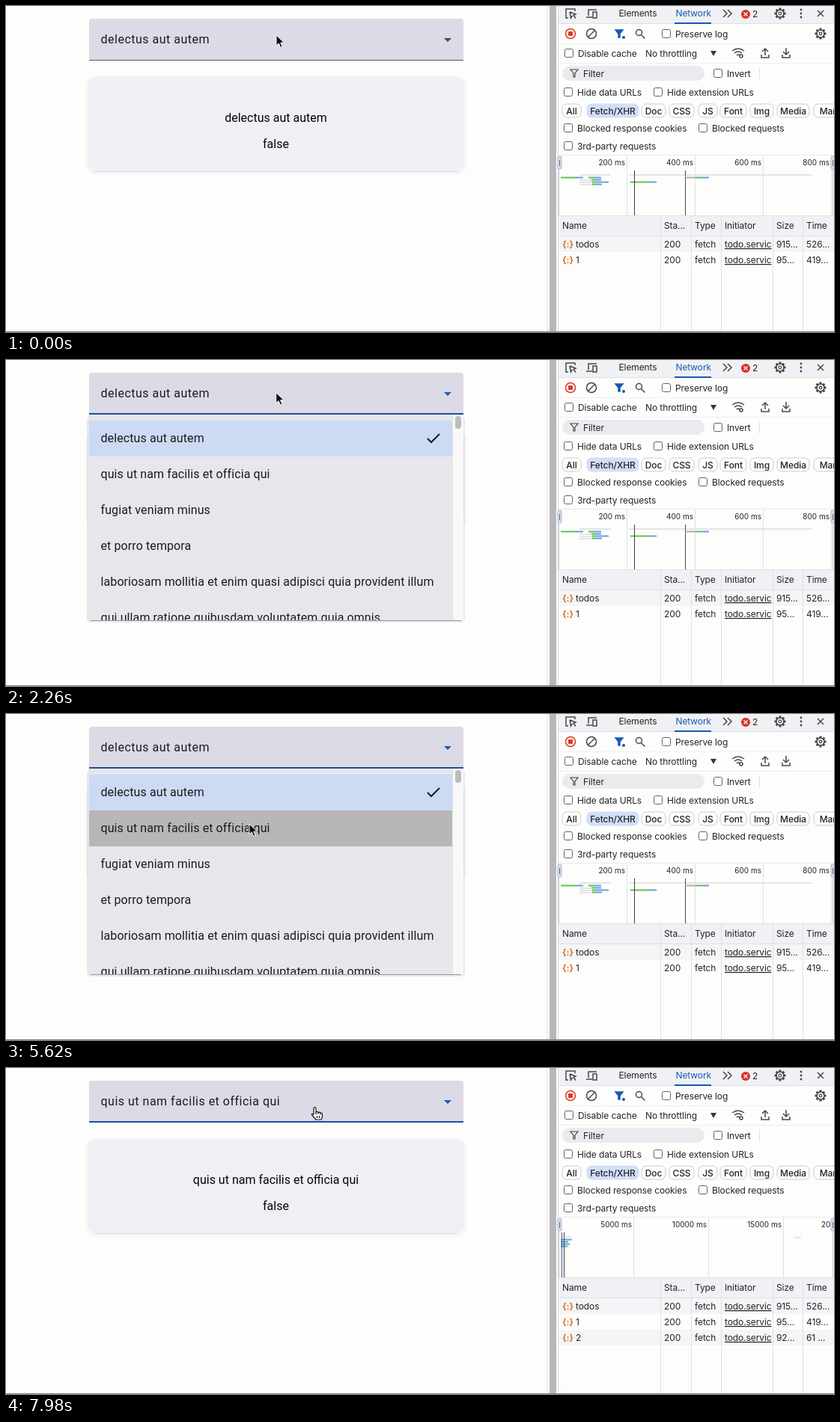
Animation, 1106 px wide and 436 px high, one loop 8 s. Source, as an HTML page:

```html
<!DOCTYPE html>
<html lang="en">
<head>
<meta charset="utf-8">
<title>Select with network panel</title>
<style>
html, body { margin: 0; width: 100%; height: 100%; overflow: hidden; background: #fdfdfb; }
svg { display: block; }
text { white-space: pre; }
.app { font: 16px Roboto, sans-serif; fill: #1b1b1f; }
.tools { font: 12px Inter, sans-serif; letter-spacing: -.1px; fill: #232326; }
.small { font-size: 10px; letter-spacing: 0; }
.icon { fill: none; stroke: #47474b; stroke-width: 1.5; }
</style>
</head>
<body>
<svg id="stage" width="1106" height="436" viewBox="0 0 1106 436"></svg>
<script>
const LOOP = 8000, FOCUS = 1700, OPEN = 1880, PRESS = 5450, CLOSE = 5720, LOADED = 5860;
const PAGE = '#fdfdfb', BAR = '#f0f1f4', RULE = '#dfe0e5', BLUE = '#1559b7';
const FIRST = 'delectus aut autem', SECOND = 'quis ut nam facilis et officia qui';
const OPTIONS = [FIRST, SECOND, 'fugiat veniam minus', 'et porro tempora',
  'laboriosam mollitia et enim quasi adipisci quia provident illum',
  'qui ullam ratione quibusdam voluptatem quia omnis'];
// time, x, y of the pointer tip
const PATH = [[0, 361, 39], [900, 361, 39], [1500, 361, 43], [2200, 361, 43], [3060, 341, 86],
  [4100, 322, 140], [4900, 322, 140], [PRESS, 325, 147], [5900, 325, 147],
  [7120, 370, 122], [7480, 374, 64], [7980, 412, 53], [LOOP, 412, 53]];

const rect = (x, y, w, h, fill, more = '') =>
  `<rect x="${x}" y="${y}" width="${w}" height="${h}" fill="${fill}" ${more}/>`;
const text = (x, y, s, more = '') => `<text x="${x}" y="${y}" ${more}>${s}</text>`;
const path = (d, more = '') => `<path d="${d}" ${more}/>`;
const vline = (x, y, h, fill = RULE) => rect(x, y, 1, h, fill);
const icon = (d, more = '') => path(d, `class="icon" ${more}`);
const check = (x, y, label) =>
  rect(x - 5.5, y - 5.5, 11, 11, '#fefefe', 'rx="2" stroke="#626266"') +
  text(x + 12, y + 4.5, label);
const funnel = (x, y, more = '') =>
  icon(`M${x - 5} ${y - 5}h10l-4 5v5h-2v-5z`, more);

function gear(x, y) {
  let teeth = '';
  for (let a = 0; a < 360; a += 45)
    teeth += rect(x - 1.5, y - 7.5, 3, 3, '#47474b', `transform="rotate(${a} ${x} ${y})"`);
  return teeth + `<circle cx="${x}" cy="${y}" r="5" class="icon"/>
    <circle cx="${x}" cy="${y}" r="1.8" class="icon" style="stroke-width:1.2"/>`;
}

function requestRow(i, name, size, time) {
  const y = 308 + i * 21, base = y + 15;
  return (i % 2 ? '' : rect(738, y, 368, 21, '#f5f5f7')) +
    text(743, base, '{:}', 'fill="#d9732a" font-weight="700"') +
    text(761, base, name) + text(879, base, '200') + text(920, base, 'fetch') +
    text(960, base, 'todo.servic', 'text-decoration="underline"') +
    text(1029, base, size) + text(1069, base, time);
}

function app() {
  const rows = OPTIONS.map((s, i) =>
    text(126.5, 110 + i * 48, s, 'letter-spacing=".1"')).join('');
  return `<g class="app">
    ${rect(106, 93, 510, 133, '#f7f6f8', 'rx="15"')}
    ${rect(109, 95, 503, 126, '#f1eff4', 'rx="12"')}
    ${rect(116, 221, 489, 1, '#dfdde2')}
    ${text(360.5, 155, FIRST, 'id="title" text-anchor="middle" fill="#050505"')}
    ${text(360.5, 190, 'false', 'text-anchor="middle" fill="#050505"')}
    ${path('M111 73V21q0-4 4-4h492q4 0 4 4v52z', 'fill="#dbdae5"')}
    ${text(126.5, 50, FIRST, 'id="value" letter-spacing=".5"')}
    ${path('M585 43h10l-5 5z', 'id="caret"')}
    <rect id="line" x="111" width="500"/>
    <g id="panel">
      ${rect(108, 76, 505, 275, '#b9b7c0', 'rx="5" opacity=".3"')}
      ${path('M110 73h501v272q0 4-4 4H114q-4 0-4-4z', 'fill="#e8e6eb"')}
      ${rect(111, 81, 486, 48, '#cddaf4')}
      <rect id="hover" x="111" y="129" width="486" height="48"/>
      ${path('M597 73h14v272q0 4-4 4h-10z', 'fill="#f8f8f9"')}
      ${vline(596, 73, 275, '#e5e4e7')}
      ${rect(600, 75, 8, 17, '#bcbcbe', 'rx="4"')}
      <g clip-path="url(#clip)">${rows}</g>
      ${path('M563 105l5 5 11-11', 'fill="none" stroke="#1b1b1f" stroke-width="2"')}
      ${rect(113, 348, 495, 1, '#98979c')}
    </g></g>`;
}

function toolbar() {
  const chips = [['All', 743, 25], ['Fetch/XHR', 776, 69], ['Doc', 849, 32], ['CSS', 886, 33],
    ['JS', 925, 25], ['Font', 954, 35], ['Img', 994, 31], ['Media', 1030, 43], ['Man', 1079, 40]];
  const chip = ([s, x, w]) => {
    const on = s === 'Fetch/XHR';
    return rect(x, 131, w, 18, on ? '#d2dff8' : PAGE, `rx="6" stroke="${on ? '#d2dff8' : '#cbccd1'}"`) +
      text(x + w / 2, 144.5, s, 'text-anchor="middle" font-weight="500"');
  };
  return rect(738, 0, 368, 24, BAR) + rect(738, 23, 368, 1, RULE) +
    icon('M760 7V4H748v12h3M753 8l8 3-3 1.500 3 4M753 8l1.500 8 2-3') +
    icon('M778 13V5h11M775 15h8M784 8h5v8h-5z') +
    text(818.5, 14, 'Elements') + text(894.5, 14, 'Network', `fill="${BLUE}"`) +
    rect(893, 22, 49, 2, BLUE) +
    icon('M958 5l5 5-5 5M964 5l5 5-5 5') +
    '<circle cx="988" cy="11" r="6" fill="#d93025"/>' +
    path('M985.500 8.500l5 5m0-5l-5 5', 'stroke="#fff" stroke-width="1.300"') +
    text(997, 15, '2') + gear(1034, 10) +
    [5, 10, 15].map(y => `<circle cx="1062" cy="${y}" r="1.4" fill="#47474b"/>`).join('') +
    icon('M1084 6l8 8m0-8l-8 8') +

    '<circle cx="754" cy="37" r="6.500" fill="none" stroke="#d83b2b" stroke-width="1.500"/>' +
    rect(751, 34, 6, 6, '#d83b2b', 'rx="1"') +
    '<circle cx="782" cy="37" r="6.500" class="icon"/>' + icon('M777.500 41.500l9-9') +
    funnel(819, 37, `style="fill:${BLUE};stroke:${BLUE}"`) +
    `<circle cx="825" cy="42" r="2" fill="${BLUE}"/>` +
    '<circle cx="845.500" cy="35.500" r="4" class="icon"/>' + icon('M848.500 38.500l5 5') +
    check(882, 37, 'Preserve log') + gear(1088, 37) +
    rect(738, 50, 368, 1, '#f1f1f3') +

    check(752, 63, 'Disable cache') + text(854, 68, 'No throttling') +
    path('M941 60h8l-4 7z', 'fill="#363639"') +
    icon('M970 60q8-6 16 0M973 63q5-4 10 0M976 66q2-2 4 0') +
    '<circle cx="982" cy="67" r="2" class="icon"/>' +
    icon('M1014 66V57M1010 61l4-4 4 4M1009 65v4h10v-4') +
    icon('M1042 56v9M1038 61l4 4 4-4M1037 65v4h10v-4') +
    rect(738, 76, 368, 1, '#ececef') +

    rect(743, 80, 190, 20, '#e9ebef', 'rx="10"') +
    funnel(759, 90, 'style="stroke-width:1.2"') + text(771, 94.5, 'Filter') +
    check(951, 90, 'Invert') + vline(1006, 82, 16) +
    check(751, 115, 'Hide data URLs') + check(871, 115, 'Hide extension URLs') +
    chips.map(chip).join('') +
    check(751, 163, 'Blocked response cookies') + check(931, 163, 'Blocked requests') +
    check(751, 187, '3rd-party requests');
}

// bars: [x, y, width, colour]
function overview(id, marks, bars, lines) {
  return `<g id="${id}">` +
    marks.map(([x, s]) => vline(x, 200, 80) +
      text(x - 2, 213, s, 'class="small" text-anchor="end"')).join('') +
    bars.map(([x, y, w, c]) => rect(x, y, w, 2, c)).join('') +
    lines.map(([x, c]) => vline(x, 220, 60, c)).join('') + '</g>';
}

function tools() {
  const green = '#5fc052', blue = '#6a9fdc', pale = '#e3e4e4', cyan = '#4bacd0', dark = '#3d3b40';
  const short = overview('before',
    [[829, '200 ms'], [920, '400 ms'], [1011, '600 ms'], [1102, '800 ms']],
    [[766, 225, 42, pale], [832, 225, 244, pale], [741, 228.5, 20, green], [761, 228.5, 10, blue],
      [766, 232, 18, pale], [778, 228.5, 7, green], [785, 228.5, 10, blue],
      [782, 231.5, 5, green], [787, 231.5, 8, blue], [766, 235, 18, pale],
      [783, 234.5, 4, green], [787, 234.5, 18, blue], [766, 238, 18, pale],
      [783, 237.5, 5, green], [788, 237.5, 8, blue],
      [834, 234.5, 25, green], [859, 234.5, 10, blue],
      [909, 228.5, 13, '#adada8'], [922, 228.5, 7, green], [929, 228.5, 10, blue]],
    [[839, dark], [907, '#5c4548']]);
  const long = overview('after',
    [[838, '5000 ms'], [938, '10000 ms'], [1038, '15000 ms']],
    [[741, 228.5, 15, blue], [741, 231.5, 10, cyan], [741, 234.5, 12, blue], [741, 237.5, 9, cyan],
      [748, 225, 7, pale], [1052, 225.5, 10, pale]],
    [[742, '#33518b'], [745, dark]]);
  return `<g class="tools">
    ${rect(722, 0, 2, 436, '#f0f0f1')}${rect(726, 0, 9, 436, '#b7b7b8')}
    ${vline(737, 0, 436, '#d8d8dc')}
    ${toolbar()}
    ${rect(738, 199, 368, 1, '#e9e9ec')}
    ${short}${long}
    ${text(1089, 213, '20', 'id="twenty" class="small"')}
    ${rect(737, 201, 5, 17, '#d3deef', 'rx="2" stroke="#a9b6cc"')}${vline(739, 206, 8, '#5f687e')}
    ${rect(1102, 201, 6, 17, '#d3deef', 'rx="2" stroke="#a9b6cc"')}${vline(1104, 206, 8, '#5f687e')}
    ${vline(738, 219, 61, '#bfcbdf')}${vline(1104, 219, 61, '#bfcbdf')}
    ${rect(738, 280, 368, 27, BAR)}${rect(738, 280, 368, 1, RULE)}
    ${rect(738, 307, 368, 1, RULE)}
    ${[['Name', 743], ['Sta...', 879], ['Type', 920], ['Initiator', 960], ['Size', 1029], ['Time', 1069]]
      .map(([s, x]) => text(x, 298, s)).join('')}
    ${requestRow(0, 'todos', '915...', '526...')}
    ${requestRow(1, '1', '95...', '419...')}
    <g id="added">${requestRow(2, '2', '92...', '61 ...')}</g>
    ${[874, 915, 955, 1024, 1064].map(x => vline(x, 281, 154)).join('')}
    </g>${rect(0, 435, 1106, 1, '#858587')}`;
}

const pointers = `
  ${path('M0 0v14l3.300-3 2.400 5.500 2.500-1.100-2.400-5.300h4.700z',
    'id="arrow" fill="#111" stroke="#fefefe" stroke-width="1"')}
  ${path('M-1 1q0-1.500 1.500-1.500T2 1v5q2-1.500 3 .5 2-1 3 .7 2.500-.7 2.500 2v3L9 16H2L-3.500 9.500q-.5-2 2.500-.5z' +
    'M2 6v3M5 6.500v2.500M8 7.200v2M3.500 11v3M6.500 11v3',
    'id="hand" fill="#fefefe" stroke="#111" stroke-width="1.200" stroke-linejoin="round"')}`;

const stage = document.getElementById('stage');
stage.innerHTML = '<clipPath id="clip"><path d="M110 73h487v275H110z"/></clipPath>' +
  app() + tools() + `<g id="pointer">${pointers}</g>`;

const $ = id => document.getElementById(id);
const set = (id, values) => Object.entries(values).forEach(([k, v]) => $(id).setAttribute(k, v));
const show = (id, on) => set(id, { visibility: on ? 'visible' : 'hidden' });
const clamp = v => Math.max(0, Math.min(1, v));

function pointerAt(t) {
  const i = PATH.findIndex(p => p[0] > t);
  const [t0, x0, y0] = PATH[i - 1], [t1, x1, y1] = PATH[i];
  const k = (t - t0) / (t1 - t0), ease = k * k * (3 - 2 * k);
  return [x0 + (x1 - x0) * ease, y0 + (y1 - y0) * ease];
}

function draw(t) {
  const [x, y] = pointerAt(t);
  const focused = t >= FOCUS, chosen = t >= CLOSE, loaded = t >= LOADED;
  // The open panel covers the field, so only its options show the hand
  const isOpen = t >= OPEN && t < CLOSE;
  const isHand = isOpen ? y >= 81 && t < PRESS : t >= 900 && y < 73;

  set('pointer', { transform: `translate(${x} ${y})` });
  show('arrow', !isHand);
  show('hand', isHand);

  set('line', { y: focused ? 71 : 72, height: focused ? 2 : 1, fill: focused ? '#194f9b' : '#5a5a60' });
  set('caret', { fill: focused ? '#1c5cb0' : '#46464c' });
  $('value').textContent = chosen ? SECOND : FIRST;
  $('title').textContent = loaded ? SECOND : FIRST;

  const grow = clamp((t - OPEN) / 120), fade = 1 - clamp((t - CLOSE) / 100);
  const scale = .8 + .2 * (1 - (1 - grow) ** 3);
  set('panel', { opacity: grow * fade, transform: `translate(0 73) scale(1 ${scale}) translate(0 -73)` });
  const press = clamp((t - PRESS) / 150);
  const tint = [211, 209, 212].map(c => Math.round(c - 27 * press));
  set('hover', { fill: `rgb(${tint})`, opacity: y >= 129 ? 1 : 0 });

  show('before', !loaded);
  for (const id of ['after', 'twenty', 'added']) show(id, loaded);
}

function tick(now) {
  draw(now % LOOP);
  requestAnimationFrame(tick);
}
draw(0);
requestAnimationFrame(tick);
</script>
</body>
</html>
```
